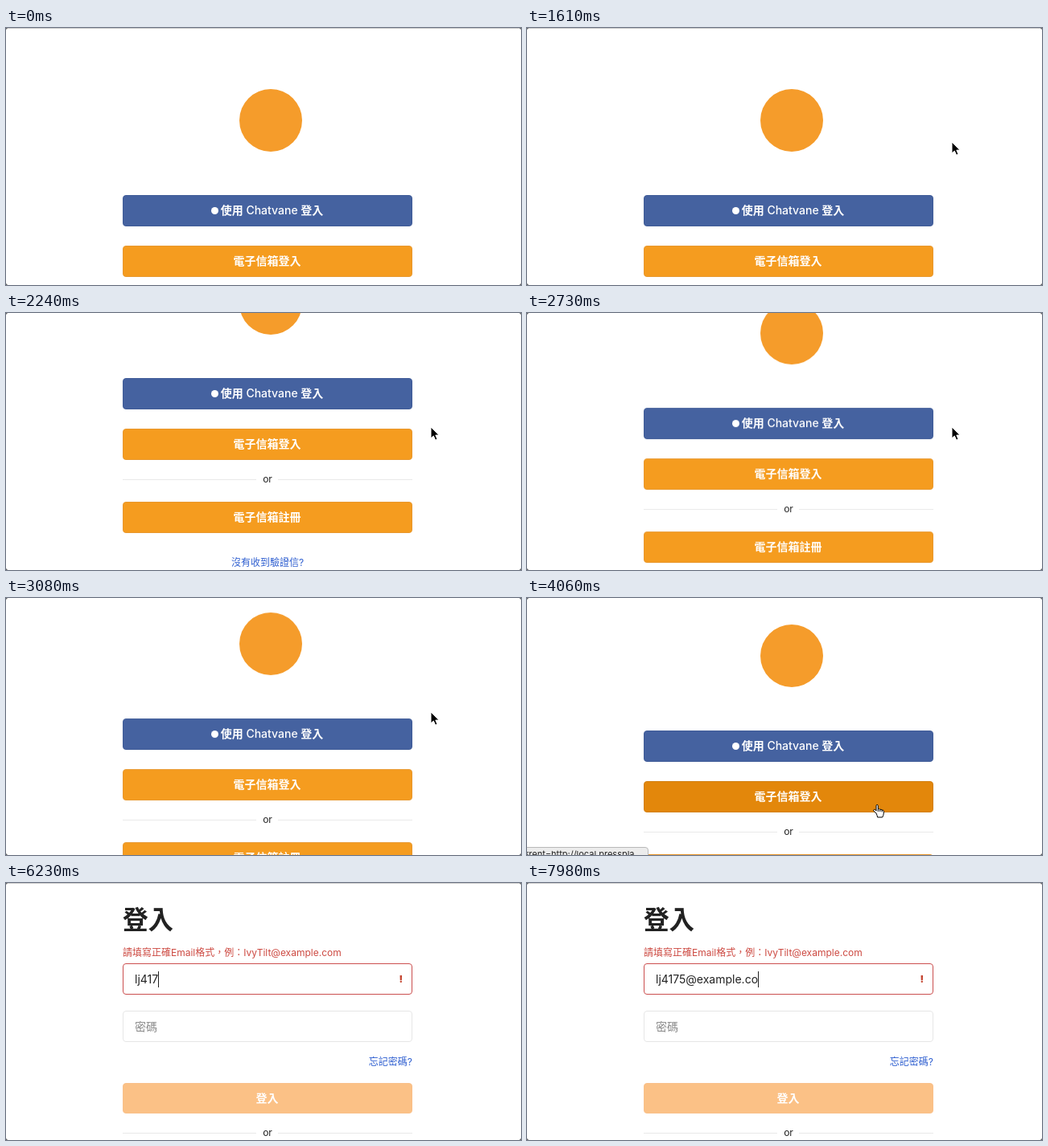
Animation of 640x320 px, one loop 8 s. Source, as an HTML page:

```html
<!DOCTYPE html>
<html lang="zh-Hant">
<head>
<meta charset="utf-8">
<title>登入</title>
<style>
  html, body { margin: 0; width: 100%; height: 100%; overflow: hidden; background: #fff; }
  * { box-sizing: border-box; }
  #stage {
    position: relative; width: 640px; height: 320px; overflow: hidden; background: #fff; color: #222;
    font: 14px/20px Inter, "Noto Sans CJK TC", "Noto Sans CJK", sans-serif;
  }
  #stage * { animation-duration: 8s; animation-iteration-count: infinite; animation-timing-function: step-end; }
  .page, .body { position: absolute; left: 0; top: 0; width: 640px; height: 480px; }
  .topline { position: absolute; left: 0; top: 0; width: 640px; height: 1px; background: #cfcfcf; }

  /* shared parts */
  .btn {
    position: absolute; left: 145px; width: 360px; height: 39px; line-height: 35px; padding-right: 1px;
    border: 1px solid #e8982f; border-radius: 4px;
    text-align: center; color: #fff; font-weight: 600; background: #f59c1f;
  }
  .or { position: absolute; left: 145px; width: 360px; font-size: 12px; text-align: center; }
  .or::before, .or::after { content: ""; position: absolute; top: 10px; height: 1px; background: #e9e9e9; }
  .or::before { left: 0; width: 166px; }
  .or::after { right: 0; width: 167px; }
  .link { position: absolute; left: 145px; width: 360px; font-size: 12px; text-align: center; color: #2f5fd0; }

  /* landing page */
  #landing { animation-name: leave; }
  #scroll { animation-name: scroll; }
  .logo { position: absolute; left: 290px; top: 76px; width: 78px; height: 78px; border-radius: 50%; background: #f59c2b; }
  #social { top: 208px; border-color: #405c98; background: #4562a0; animation-name: hover-social; }
  #social i { display: inline-block; width: 9px; height: 9px; margin-right: 3px; border-radius: 50%; background: #fff; }
  #social span { font-weight: 500; }
  #mail { top: 271px; animation-name: hover-mail; }
  #status {
    position: absolute; left: -4px; top: 310px; width: 155px; height: 22px; padding-left: 1px;
    border: 1px solid #b9b9b9; border-radius: 0 4px 0 0; background: #ececec;
    font-size: 11px; line-height: 16px; white-space: nowrap; color: #222; animation-name: status;
  }

  /* login page */
  #login { opacity: 0; animation-name: arrive; }
  h1 { position: absolute; left: 145px; top: 26px; margin: 0; font-size: 31.5px; line-height: 40px; font-weight: 600; }
  #error { position: absolute; left: 145px; top: 77px; font-size: 12px; white-space: nowrap; color: #cd4a42; animation-name: invalid; }
  .body { animation-name: push; }
  .field {
    position: absolute; left: 145px; width: 360px; height: 39px; padding-left: 14px;
    display: flex; align-items: center; border: 1px solid #e6e6e6; border-radius: 4px; white-space: pre;
  }
  .hint { position: absolute; left: 14px; color: #8b8b8b; }
  #email { top: 82px; animation-name: field; }
  #email .hint { animation-name: hint; }
  #caret { width: 1px; height: 20px; background: #222; animation-name: caret; }
  #bang { position: absolute; right: 11px; font-size: 12px; font-weight: 900; color: #c4442f; animation-name: invalid; }
  #send { top: 231px; height: 38px; line-height: 35px; border-color: #f9c08a; background: #fbc186; }

  /* pointer */
  #pointer { position: absolute; left: 0; top: 0; animation-name: travel; }
  #pointer svg { position: absolute; overflow: visible; }
  #arrow { left: 0; top: 0; animation-name: arrow; }
  #hand { left: -5px; top: 0; animation-name: hand; }
  #beam { left: -4px; top: -8px; animation-name: beam; }

  /* rounded window corners */
  #corners {
    position: absolute; inset: 0;
    background:
      linear-gradient(135deg, #666 1px, transparent 2px) 0 0,
      linear-gradient(225deg, #666 1px, transparent 2px) 100% 0,
      linear-gradient(45deg, #666 1px, transparent 2px) 0 100%,
      linear-gradient(315deg, #666 1px, transparent 2px) 100% 100%;
    background-size: 4px 4px; background-repeat: no-repeat;
  }

  @keyframes leave { 0% { opacity: 1 } 56.875%, 100% { opacity: 0 } }
  @keyframes arrive { 0% { opacity: 0 } 56.875%, 100% { opacity: 1 } }
  @keyframes scroll {
    0% { transform: none }
    20.6% { transform: translateY(0); animation-timing-function: ease-in-out }
    26.9% { transform: translateY(-127px) }
    30% { transform: translateY(-127px); animation-timing-function: ease-in }
    34.125% { transform: translateY(-90px); animation-timing-function: linear }
    37.6% { transform: translateY(-64px); animation-timing-function: ease-out }
    42.5%, 100% { transform: translateY(-43px) }
  }
  @keyframes hover-social {
    0%, 12.9%, 100% { background: #4562a0 }
    10.5% { background: #3b558d }
  }
  @keyframes hover-mail {
    0%, 9.1% { background: #f59c1f; border-color: #e8982f }
    6.8%, 47%, 100% { background: #e3870b; border-color: #d27f10 }
  }
  @keyframes status { 0% { opacity: 0 } 49%, 100% { opacity: 1 } }
  @keyframes field {
    0% { border-color: #e6e6e6 }
    58.6% { border-color: #e6e6e6; animation-timing-function: linear }
    59.4% { border-color: #8fa4c6 }
    70%, 100% { border-color: #cb4f4f }
  }
  @keyframes hint { 0% { opacity: 1 } 70%, 100% { opacity: 0 } }
  @keyframes invalid { 0% { opacity: 0 } 70%, 100% { opacity: 1 } }
  @keyframes push { 0% { transform: none } 70%, 100% { transform: translateY(18px) } }
  @keyframes caret { 0%, 64.75% { opacity: 0 } 58.6%, 70%, 100% { opacity: 1 } }
  @keyframes travel {
    0% { transform: translate(395px, 324px) }
    6.1% { transform: translate(395px, 322px); animation-timing-function: linear }
    11.25% { transform: translate(440px, 235px); animation-timing-function: linear }
    15.75% { transform: translate(485px, 160px); animation-timing-function: ease-out }
    18.75% { transform: translate(528px, 142px) }
    43.5% { transform: translate(528px, 142px); animation-timing-function: ease-in }
    46% { transform: translate(520px, 215px); animation-timing-function: ease-out }
    49.5% { transform: translate(435px, 257px) }
    56.5% { transform: translate(435px, 257px); animation-timing-function: ease-in }
    57.75% { transform: translate(428px, 238px); animation-timing-function: ease-out }
    59.4%, 100% { transform: translate(410px, 115px) }
  }
  @keyframes arrow {
    0%, 9.1%, 12.9%, 56.875% { opacity: 1 }
    6.8%, 10.5%, 47%, 59.1%, 100% { opacity: 0 }
  }
  @keyframes hand {
    0%, 9.1%, 12.9%, 56.875%, 100% { opacity: 0 }
    6.8%, 10.5%, 47% { opacity: 1 }
  }
  @keyframes beam { 0%, 70%, 100% { opacity: 0 } 59.1% { opacity: 1 } }
</style>
</head>
<body>
<div id="stage">
  <div id="landing" class="page">
    <div id="scroll" class="page">
      <div class="topline"></div>
      <div class="logo"></div>
      <div id="social" class="btn"><i></i>使用 <span>Chatvane</span> 登入</div>
      <div id="mail" class="btn">電子信箱登入</div>
      <div class="or" style="top:324px">or</div>
      <div class="btn" style="top:362px">電子信箱註冊</div>
      <div class="link" style="top:428px">沒有收到驗證信?</div>
    </div>
    <div id="status">rrent=http://local.presspla...</div>
  </div>

  <div id="login" class="page">
    <div class="topline"></div>
    <h1>登入</h1>
    <div id="error">請填寫正確Email格式&#xff0c;例&#xff1a;IvyTilt@example.com</div>
    <div class="body">
      <div id="email" class="field"><span class="hint">電子信箱</span><span id="typed"></span><span id="caret"></span><span id="bang">!</span></div>
      <div class="field" style="top:141px"><span class="hint">密碼</span></div>
      <div class="link" style="top:195px;text-align:right">忘記密碼?</div>
      <div id="send" class="btn">登入</div>
      <div class="or" style="top:283px">or</div>
    </div>
  </div>

  <div id="pointer">
    <svg id="arrow" width="12" height="18"><path d="M0 0V14L3.3 11L5.6 16.2L8 15.2L5.8 10.1H10Z" stroke="#fff"/></svg>
    <svg id="hand" width="15" height="18"><path d="M4 11L1 8.4Q0 6.9 1.4 6.4Q2.6 6.2 4 8V1.6Q4 .5 5.1 .5Q6.3 .5 6.3 1.6V6Q7.6 5 8.7 6.4Q10 5.6 11.1 7Q13 6.6 13.3 8.6V11Q13 13.6 11.7 16H5.6Q5 13 4 11ZM6.3 6V9M8.7 6.4V9M11.1 7V9.4" fill="#fff" stroke="#000"/></svg>
    <svg id="beam" width="8" height="17"><path d="M1 .5Q4 .5 4 3V14Q4 16.5 1 16.5M7 .5Q4 .5 4 3M4 14Q4 16.5 7 16.5M2.5 10H5.5" fill="none" stroke="#111" stroke-width="1.2"/></svg>
  </div>
  <div id="corners"></div>
</div>

<script>
  const LOOP = 8000, START = 5600, KEY = 140;
  const address = "lj4175@example.co";
  const typed = document.getElementById("typed");
  // share the clock of the style animations
  const clock = document.getElementById("pointer").getAnimations()[0];

  function draw(now) {
    const t = (clock?.currentTime ?? now) % LOOP;
    const count = Math.max(0, Math.floor((t - START) / KEY) + 1);
    typed.textContent = address.slice(0, count);
    requestAnimationFrame(draw);
  }
  requestAnimationFrame(draw);
</script>
</body>
</html>
```
